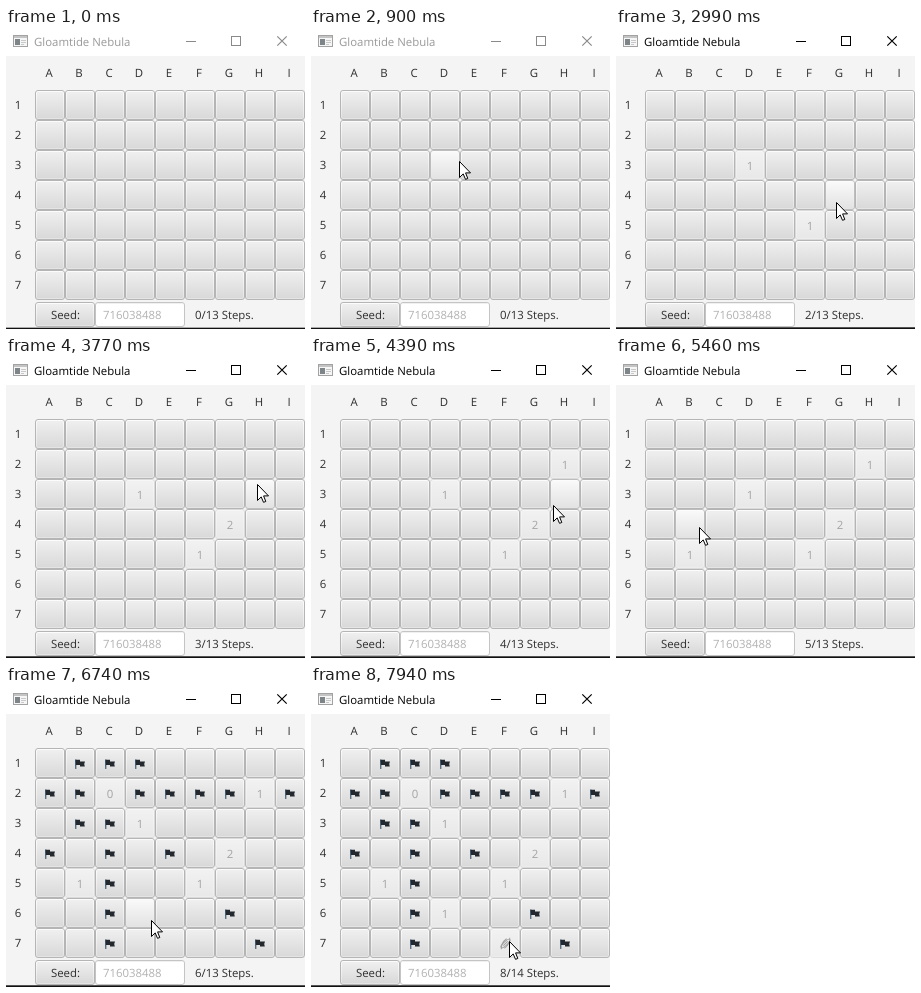
These frames come from a looping animation (299x301 px, 8000 ms). An HTML page:

```html
<!DOCTYPE html>
<html lang="en">
<head>
<meta charset="utf-8">
<title>Gloamtide Nebula</title>
<style>
  html, body { margin: 0; width: 100%; height: 100%; overflow: hidden; background: #f4f4f4; }
  svg { display: block; width: 299px; height: 301px; }
  text { font: 11.4px "Open Sans", "Noto Sans", sans-serif; fill: #2e2e2e; white-space: pre; text-rendering: geometricPrecision; }
  .mid { text-anchor: middle; }
  .off { opacity: .4; }
  .rim { fill: url(#rim); stroke: #b5b5b5; }
  .face { fill: url(#body); }
  .hover .rim { stroke: #bdbdbd; }
  .hover .face { fill: url(#lit); }
  #title { fill: #999; }
  #controls { fill: none; stroke: #8a8a8a; }
  #edge { fill: #aaa; }
  .active #title { fill: #000; }
  .active #controls { stroke: #000; }
  .active #edge { fill: #555; }
</style>
</head>
<body>
<svg id="stage" viewBox="0 0 299 301">
  <defs>
    <linearGradient id="body" x2="0" y2="1">
      <stop stop-color="#efefef"/><stop offset="1" stop-color="#d9d9d9"/>
    </linearGradient>
    <linearGradient id="lit" x2="0" y2="1">
      <stop stop-color="#f9f9f9"/><stop offset="1" stop-color="#e3e3e3"/>
    </linearGradient>
    <linearGradient id="rim" x2="0" y2="1">
      <stop stop-color="#fdfdfd"/><stop offset="1" stop-color="#e4e4e4"/>
    </linearGradient>
    <g id="flag">
      <path fill="#2f4a63" d="M0 .5h1.3V10H.3Z"/>
      <path fill="#22282e" d="M1 .8H5V2.5H10L9.2 5 9.8 7.6H5V6H1Z"/>
    </g>
    <g id="galaxy" fill="none" stroke="#222" transform="rotate(-42)">
      <ellipse rx="6" ry="1.8"/>
      <path d="M-7 1.5Q-3-3.5 4-2.8M7-1.5Q3 3.5-4 2.8M-3 0H3"/>
    </g>
  </defs>

  <rect width="299" height="301" fill="#f4f4f4"/>
  <rect width="299" height="28" fill="#fff"/>
  <g id="icon">
    <rect x="7.5" y="7.5" width="14" height="11" fill="#f6f6f6" stroke="#a2a2a2"/>
    <path d="M8 9h13" stroke="#c4c4c4" stroke-width="2"/>
    <path d="M9 11h5v6H9z" fill="#7d8588"/>
    <path d="M15 12.5h5M15 14.5h5M15 16.5h3" stroke="#c8c8c8"/>
  </g>
  <text id="title" x="28" y="18">Gloamtide Nebula</text>
  <g id="controls">
    <path d="M180 13.5h10"/>
    <rect x="225.5" y="8.5" width="9" height="9"/>
    <path d="M271.3 8.3l9.4 9.4m0-9.4l-9.4 9.4" stroke-width="1.2"/>
  </g>

  <g id="board"></g>

  <g id="field">
    <rect x="89.5" y="274.5" width="89" height="24" rx="2.5" fill="#fff" stroke="#c4c4c4"/>
    <path d="M91 275.5h86" stroke="#f0f0f0"/>
    <text x="97" y="291" style="fill:#b2b2b2">716038488</text>
  </g>
  <text id="steps" x="189" y="291"></text>
  <rect id="edge" y="299" width="299" height="1"/>
  <rect y="300" width="299" height="1" fill="#111"/>
  <path id="cursor" fill="#fff" stroke="#000" stroke-linejoin="round"
    d="M.5.5V16.5L4.2 12.9 6.5 18.3 8.8 17.5 6.6 11.9H11.5Z"/>
</svg>

<script>
const LOOP = 8000, ACTIVE = 1510;
const COLS = 'ABCDEFGHI', ROWS = 7, SIZE = 30, LEFT = 29, TOP = 62;

// pointer stops: arrival, x, y, then when it leaves, the cell it clicks and what that shows
const STOPS = [
  [260, 275, 297],
  [720, 128, 111],
  [900, 148, 133],
  [1210, 132, 143, 1580, 'D3', '1'],
  [2490, 195, 200, 2560, 'F5', '1'],
  [2990, 220, 174, 3190, 'G4', '2'],
  [3980, 257, 118, 4130, 'H2', '1'],
  [4390, 242, 148],
  [5000, 54, 202, 5130, 'B5', '1'],
  [5460, 83, 170],
  [5780, 103, 111, 5870, 'C2', '0'],
  [6170, 103, 165, 6380],
  [6740, 145, 234, 7000, 'D6', '1'],
  [7280, 184, 258, 7600, 'F7', '*'],
  [7940, 198, 255]
].map(([at, x, y, leave = at, cell, mark]) => ({ at, x, y, leave, cell, mark }));
const CLICKS = STOPS.filter(s => s.cell);
const CLEAR = CLICKS.find(s => s.mark === '0');
const FOUND = CLICKS.find(s => s.mark === '*');

const $ = id => document.getElementById(id);
const el = (name, attrs, parent, content) => {
  const node = document.createElementNS('http://www.w3.org/2000/svg', name);
  for (const key in attrs) node.setAttribute(key, attrs[key]);
  if (content) node.textContent = content;
  parent.append(node);
  return node;
};
const label = (x, y, parent, content) => el('text', { x, y, class: 'mid' }, parent, content);
const show = (node, on) => { if (node) node.style.display = on ? '' : 'none'; };

function button(x, y, w, h) {
  const g = el('g', {}, $('board'));
  el('rect', { x: x + .5, y: y + .5, width: w - 1, height: h - 1, rx: 2.5, class: 'rim' }, g);
  el('rect', { x: x + 2, y: y + 2, width: w - 4, height: h - 4, rx: 1, class: 'face' }, g);
  return { x, y, w, h, g };
}

// straight or diagonal line of sight from the cleared cell
function inLine(col, row) {
  const dx = Math.abs(col - COLS.indexOf(CLEAR.cell[0]));
  const dy = Math.abs(row + 1 - CLEAR.cell[1]);
  return !dx || !dy || dx === dy;
}

function makeCell(col, row) {
  const x = LEFT + col * SIZE, y = TOP + row * SIZE;
  const cell = button(x, y, SIZE, SIZE);
  const click = CLICKS.find(s => s.cell === COLS[col] + (row + 1));
  if (click) {
    cell.openAt = click.leave;
    cell.mark = click === FOUND
      ? el('use', { href: '#galaxy', transform: `translate(${x + 15.5} ${y + 15.5})` }, cell.g)
      : label(x + 15, y + 19.5, cell.g, click.mark);
  } else if (inLine(col, row)) {
    cell.flag = el('use', { href: '#flag', x: x + 10, y: y + 11 }, cell.g);
  }
  return cell;
}

const buttons = [];
for (let row = 0; row < ROWS; row++) {
  label(12, TOP + row * SIZE + 19, $('board'), String(row + 1));
  for (let col = 0; col < COLS.length; col++) buttons.push(makeCell(col, row));
}
[...COLS].forEach((c, i) => label(LEFT + 14 + i * SIZE, 49, $('board'), c));
const seed = button(29, 274, 60, 25);
label(59.5, 291, seed.g, 'Seed:');
buttons.push(seed);

function pointer(t) {
  const i = STOPS.findLastIndex(s => t >= s.at);
  if (i < 0) return null;
  const a = STOPS[i], b = STOPS[i + 1] || a;
  const u = t <= a.leave || a === b ? 0 : (t - a.leave) / (b.at - a.leave);
  const k = (1 - Math.cos(Math.PI * u)) / 2;
  return { x: Math.round(a.x + (b.x - a.x) * k), y: Math.round(a.y + (b.y - a.y) * k) };
}

function render(t) {
  const p = pointer(t);
  $('stage').classList.toggle('active', t >= ACTIVE);
  show($('cursor'), p);
  if (p) $('cursor').setAttribute('transform', `translate(${p.x} ${p.y})`);

  for (const b of buttons) {
    const open = t >= b.openAt;
    const over = p && p.x >= b.x && p.x < b.x + b.w && p.y >= b.y && p.y < b.y + b.h;
    b.g.classList.toggle('off', open);
    b.g.classList.toggle('hover', !!over && !open);
    show(b.mark, open);
    show(b.flag, t >= CLEAR.leave);
  }

  const done = CLICKS.filter(s => t >= s.leave).length;
  $('steps').textContent = `${done}/${t >= FOUND.leave ? 14 : 13} Steps.`;
}

const start = performance.now();
function tick(now) {
  render(Math.max(0, now - start) % LOOP);
  requestAnimationFrame(tick);
}
render(0);
requestAnimationFrame(tick);
</script>
</body>
</html>
```
